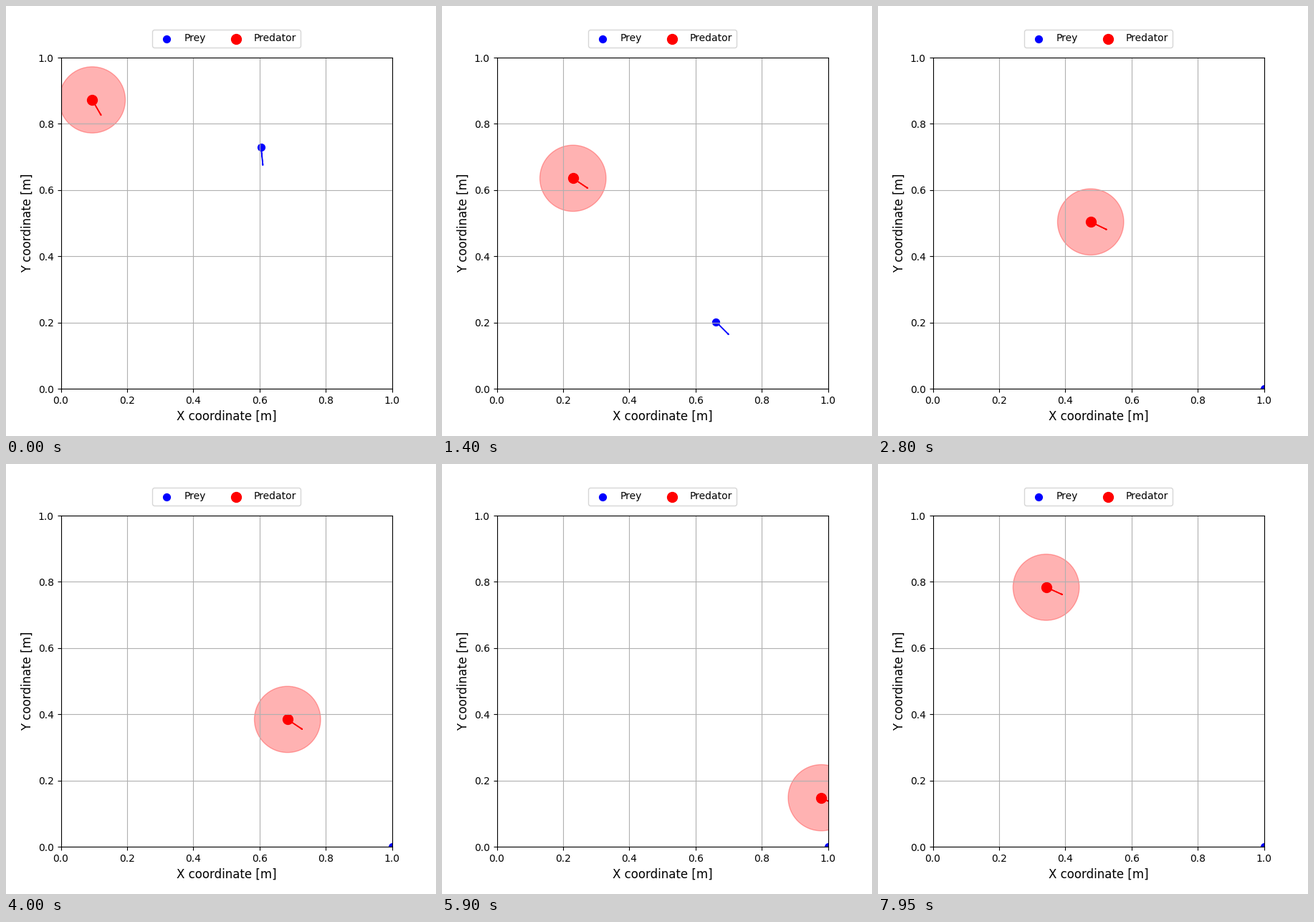
Write a matplotlib script that moves like this. It is 600 by 600 pixels and loops after 8 s.

```python
import numpy as np
import matplotlib.pyplot as plt
from matplotlib.animation import FuncAnimation

FRAMES, INTERVAL = 160, 50
RESET = 125              # the predator has caught up: a new chase starts
PREY_SPEED, PRED_SPEED = 0.02, 0.01
SIGHT, POINTER = 0.1, 0.05


def walk(start, speed, turns, steps):
    """Constant-speed walk inside the unit square.

    turns holds (step, degrees below the x axis); the heading swings
    evenly from one to the next. Returns positions and unit headings.
    """
    angle = np.radians(np.interp(np.arange(steps), *zip(*turns)))
    heads = np.column_stack([np.cos(angle), -np.sin(angle)])
    path = [np.array(start)]
    for head in heads[1:]:
        path.append(np.clip(path[-1] + speed * head, 0, 1))
    return np.array(path), heads


def two_chases(speed, first, second):
    runs = [walk(start, speed, turns, steps) for (start, turns), steps
            in zip((first, second), (RESET, FRAMES - RESET))]
    return [np.concatenate(parts) for parts in zip(*runs)]


prey_path, prey_heads = two_chases(
    PREY_SPEED,
    ((.605, .7284), [(0, 84.5), (10, 109.5), (28, 45), (36, 28)]),
    ((.700, .101), [(0, 25)]))
pred_path, pred_heads = two_chases(
    PRED_SPEED,
    ((.0948, .8723), [(0, 60), (9, 79), (28, 34), (51, 24),
                      (80, 33.7), (102, 47), (119, 25)]),
    ((.052, .948), [(0, 70), (9, 24.3)]))

fig, ax = plt.subplots(figsize=(6, 6), dpi=100)
ax.set_aspect("equal")
ax.set_xlim(0, 1)
ax.set_ylim(0, 1)
ax.set_xlabel("X coordinate [m]", fontsize=12)
ax.set_ylabel("Y coordinate [m]", fontsize=12)
ax.grid(True)

prey_dot = ax.scatter([0], [0], s=50, color="blue", label="Prey")
pred_dot = ax.scatter([0], [0], s=100, color="red", label="Predator")
prey_arrow = ax.arrow(0, 0, POINTER, 0, color="blue")
pred_arrow = ax.arrow(0, 0, POINTER, 0, color="red")
sight = ax.add_patch(plt.Circle((0, 0), SIGHT, color="red", alpha=0.3))
ax.legend(loc="upper center", bbox_to_anchor=(0.5, 1.1), ncol=2)


def place(dot, arrow, pos, head):
    dot.set_offsets([pos])
    dx, dy = POINTER * head
    arrow.set_data(x=pos[0], y=pos[1], dx=dx, dy=dy)


def update(frame):
    place(prey_dot, prey_arrow, prey_path[frame], prey_heads[frame])
    place(pred_dot, pred_arrow, pred_path[frame], pred_heads[frame])
    sight.center = pred_path[frame]
    return prey_dot, pred_dot, prey_arrow, pred_arrow, sight


anim = FuncAnimation(fig, update, frames=FRAMES, interval=INTERVAL,
                     repeat=True, repeat_delay=0)
plt.show()
```
